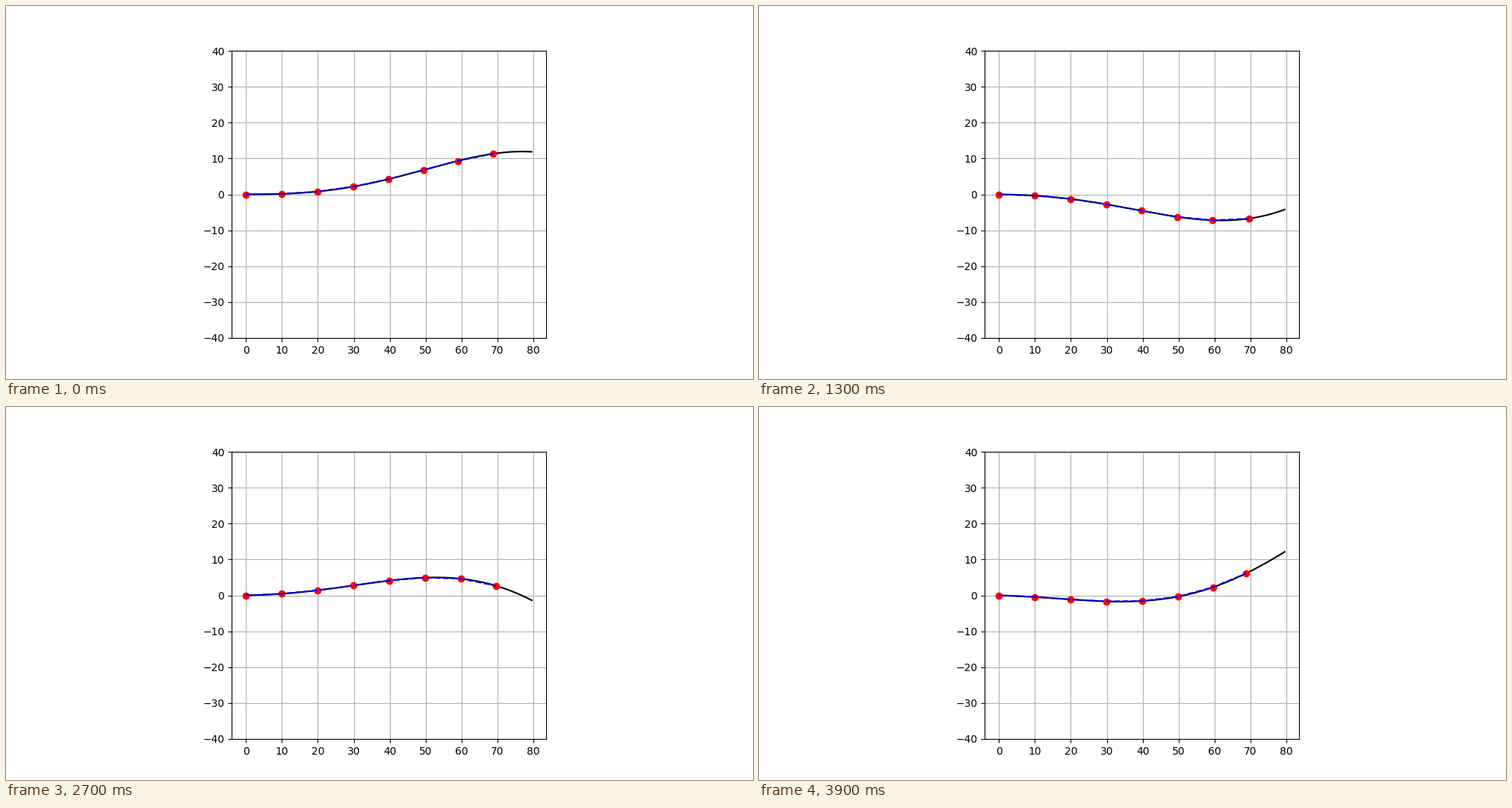
Recreate the animation shown at these times as a matplotlib script. Size 1000 by 500 pixels, loop 4 s.

```python
import matplotlib.pyplot as plt
import numpy as np
from matplotlib.animation import FuncAnimation

FRAMES, INTERVAL = 40, 100
WAVE_NUMBER = 0.75 * np.pi / 80
OMEGA = 2.0
LINK, LINKS = 10.0, 7
xs = np.arange(0, 80, 0.5)


def body(x, t):
    """Travelling wave whose amplitude grows towards the tail."""
    return (0.025 * x + 0.0023 * x**2) * np.sin(WAVE_NUMBER * x - OMEGA * t)


def next_joint(x0, t):
    """Bisect for the point on the body one link length from x0."""
    y0 = body(x0, t)
    low, high = x0, x0 + LINK
    for _ in range(40):
        mid = (low + high) / 2
        if np.hypot(mid - x0, body(mid, t) - y0) < LINK:
            low = mid
        else:
            high = mid
    return high


def joints(t):
    points = [0.0]
    for _ in range(LINKS):
        points.append(next_joint(points[-1], t))
    points = np.array(points)
    return points, body(points, t)


fig, ax = plt.subplots(figsize=(10, 5), dpi=100)
curve, = ax.plot([], [], "k-")
dots, = ax.plot([], [], "ro")
chain, = ax.plot([], [], "b--")
margin = 0.05 * xs[-1]
ax.set_aspect("equal")
ax.set_xlim(-margin, xs[-1] + margin)
ax.set_ylim(-40, 40)
ax.grid(True)


def update(frame):
    t = frame * INTERVAL / 1000
    curve.set_data(xs, body(xs, t))
    jx, jy = joints(t)
    dots.set_data(jx, jy)
    chain.set_data(jx, jy)
    return curve, dots, chain


anim = FuncAnimation(fig, update, frames=FRAMES, interval=INTERVAL, repeat=True)
plt.show()
```
